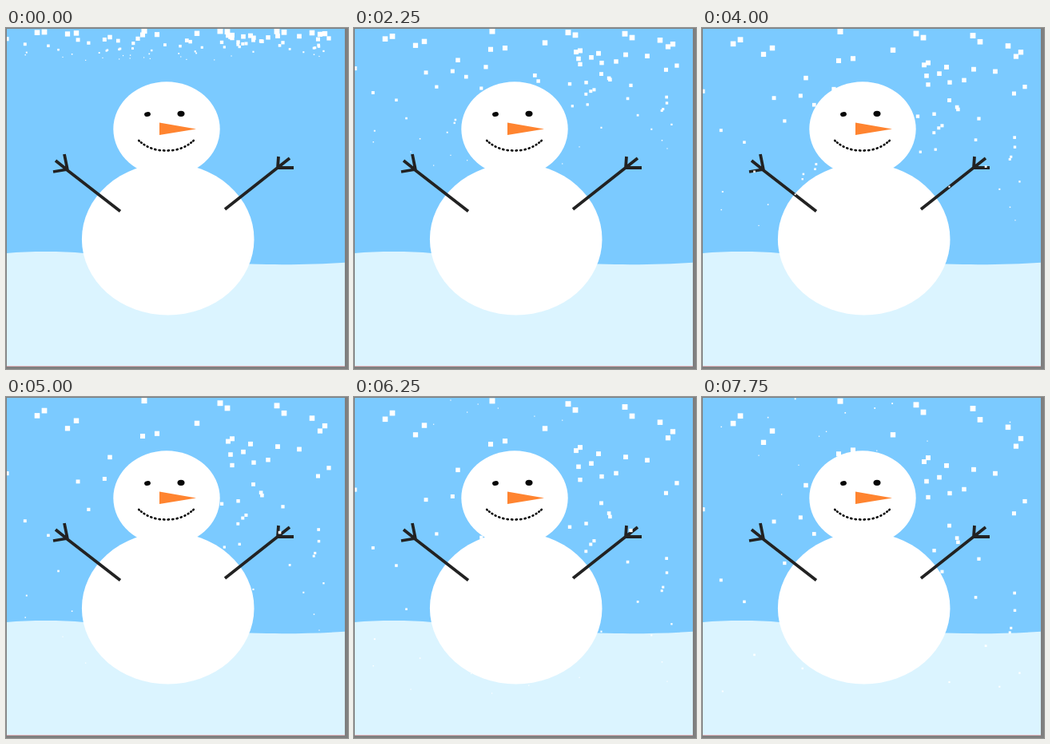
Recreate the animation shown at these times as an HTML page. Size 428 px wide and 427 px high, loop 8 s.

```html
<!DOCTYPE html>
<html>
<head>
<meta charset="utf-8">
<style>
  html, body { margin: 0; width: 100%; height: 100%; overflow: hidden; background: #7f7f7f; }
  svg { display: block; }
</style>
</head>
<body>
<svg width="428" height="427" viewBox="0 0 428 427">
  <rect x="1" y="1" width="423" height="422" fill="#7bcaff"/>
  <path d="M1 282C30 279.4 70 279.4 97 282C180 291 240 295 305 295.6C350 296.8 390 296 424 293.7V423H1Z" fill="#dbf4ff"/>
  <g fill="#fff">
    <ellipse cx="202.7" cy="264.4" rx="107.8" ry="95.1"/>
    <ellipse cx="201" cy="126.5" rx="66.7" ry="59.3"/>
  </g>
  <path d="M143 229.6L76 177.6M62 166L77 178L73 158M59 180L77 177M274 227L355 163M341 161L340 175H360"
        fill="none" stroke="#222" stroke-width="3.8"/>
  <g id="snow" fill="#fff"></g>
  <path d="M192 118.5L238 126.5L192 134Z" fill="#ff8430"/>
  <g id="coal" fill="#080808">
    <ellipse cx="177" cy="108" rx="4" ry="2.9" transform="rotate(-12 177 108)"/>
    <ellipse cx="219" cy="107.3" rx="4.5" ry="3.6"/>
  </g>
  <path d="M1 423.5H424" stroke="#e0b4bc"/>
  <path d="M0 0H428V427H0ZM1 1V424H424V1Z" fill="#7f7f7f" fill-rule="evenodd"/>
</svg>
<script>
const LOOP = 8000, STEP = 250, LEAD = 0.68, FALL = 372, COUNT = 92;

// Centres of the nearest, slowest flakes; the others are scattered at random.
const NEAR = [173, 268, 339, 277, 48, 348, 39, 383, 88, 239, 399, 77, 393, 189,
              171, 283, 278, 306, 340, 367, 297, 281, 130, 328, 310, 283, 404, 165];

let seed = 7;
const random = () => (seed = seed * 16807 % 2147483647) / 2147483647;

const add = (parent, tag, attrs) => {
  const node = document.createElementNS("http://www.w3.org/2000/svg", tag);
  for (const key in attrs) node.setAttribute(key, attrs[key]);
  return parent.appendChild(node);
};

// The smile: dots along a curve, closer together towards its ends.
const coal = document.getElementById("coal");
for (let i = 0; i < 16; i++) {
  const u = Math.sin(1.1 * (i / 7.5 - 1)) / Math.sin(1.1);
  const x = 200.5 + 34 * u;
  const y = 153.5 - 12.3 * Math.abs(u) ** 2.4;
  add(coal, "ellipse", {
    cx: x, cy: y, rx: 2.1 - 0.4 * Math.abs(u), ry: 1.4,
    transform: `rotate(${-40 * u} ${x} ${y})`
  });
}

// Flakes run from near (large, slow) to far (small, fast).
const snow = document.getElementById("snow");
const flakes = Array.from({ length: COUNT }, (_, i) => {
  const speed = 0.2 + 0.55 * i + 0.001 * i * i;
  const size = Math.max(1.2, 7 - 0.115 * speed);
  const x = NEAR[i] ?? 1 + 423 * random();
  return { speed, node: add(snow, "rect", { x: x - size / 2, width: size, height: size }) };
});

const start = performance.now();
function draw() {
  const elapsed = (performance.now() - start) % LOOP;
  const seconds = Math.floor(elapsed / STEP) * STEP / 1000;
  for (const { node, speed } of flakes) {
    node.setAttribute("y", speed * (seconds + LEAD) % FALL);
  }
  requestAnimationFrame(draw);
}
draw();
</script>
</body>
</html>
```
